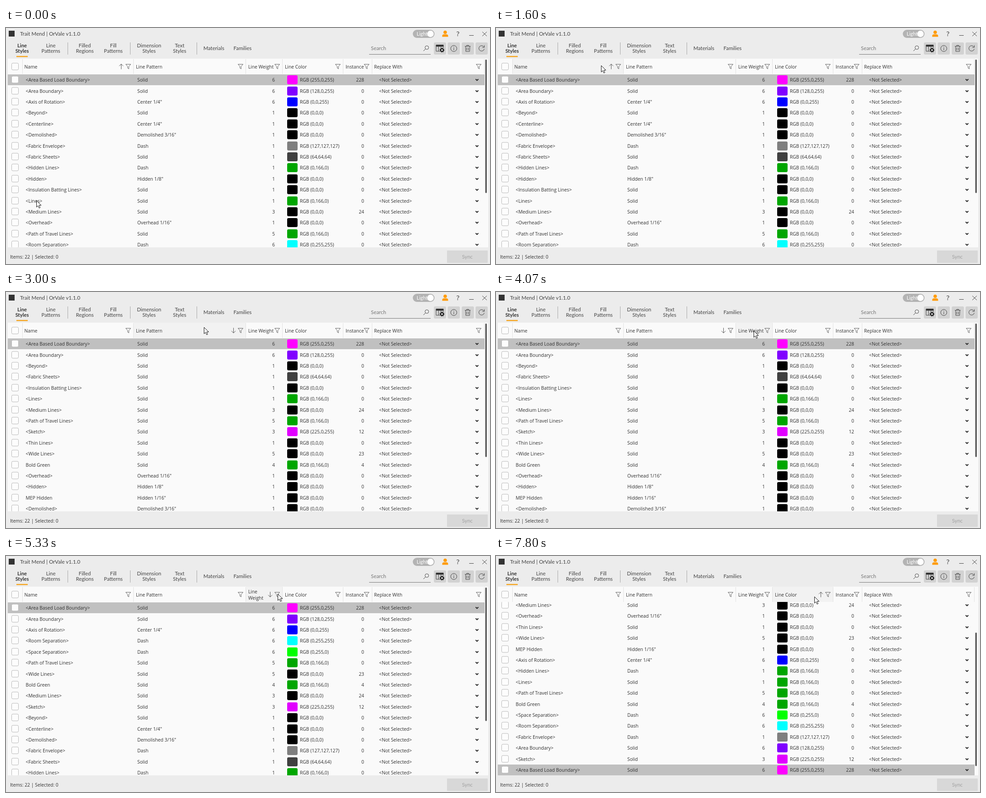
Write an HTML page that moves like this. It is 1069x524 px and loops after 8000 ms.

```html
<!DOCTYPE html>
<html lang="en">
<head>
<meta charset="utf-8">
<title>Line style table</title>
<style>
  html, body { margin: 0; width: 100%; height: 100%; overflow: hidden; background: #ececec; }
  svg { display: block; }
  text { font: 10.3px "Open Sans", "Noto Sans", sans-serif; fill: #303030; white-space: pre; }
  .ui { font: 11.4px Lato, sans-serif; fill: #444; }
  .mid { text-anchor: middle; }
  .end { text-anchor: end; }
  .line { fill: none; stroke: #444; stroke-width: 1; }
</style>
</head>
<body>
<svg id="stage" width="1069" height="524" viewBox="0 0 1069 524">
  <defs><clipPath id="body"><rect x="4" y="102" width="1053" height="385"/></clipPath></defs>
</svg>
<script>
const LOOP = 8000, STEP = 1000 / 15, ROW = 24.4, FIRST = 115.2, LAST = 475;
const stage = document.getElementById('stage');

function add(tag, attrs = {}, parent = stage, content) {
  const el = document.createElementNS('http://www.w3.org/2000/svg', tag);
  for (const key in attrs) el.setAttribute(key, attrs[key]);
  if (content !== undefined) el.textContent = content;
  parent.appendChild(el);
  return el;
}
const rect = (x, y, width, height, fill, rx = 0, parent = stage) =>
  add('rect', { x, y, width, height, fill, rx }, parent);
const label = (x, y, content, cls = '', parent = stage) =>
  add('text', { x, y, class: cls }, parent, content);
const path = (d, attrs = {}, parent = stage) => add('path', { d, class: 'line', ...attrs }, parent);
const checkbox = (y, parent = stage) =>
  add('rect', { x: 12.5, y: y - 7.5, width: 15, height: 15, rx: 2.5, fill: '#fdfdfd', stroke: '#b8b8b8' }, parent);
const show = (el, on) => el.setAttribute('visibility', on ? 'visible' : 'hidden');
const move = (el, x, y) => el.setAttribute('transform', `translate(${x} ${y})`);

function drawTitleBar() {
  rect(6, 6, 13, 13, '#333');
  label(31, 17, 'Trait Mend | OrVale v1.1.0', 'ui').style.fontSize = '11.6px';
  rect(898.5, 4, 48, 18, '#b3b3b3', 9);
  label(907, 17, 'Light', 'ui').style.cssText = 'fill:#fff;font-size:11px';
  add('circle', { cx: 937.5, cy: 13, r: 7.2, fill: '#fff' });
  add('circle', { cx: 970, cy: 9.5, r: 3.8, fill: '#ff9c0a' });
  path('M963.5 19.5v-2q0-3.5 4-3.5h5q4 0 4 3.5v2z', { style: 'fill:#ff9c0a;stroke:none' });
  label(998, 18, '?', 'mid').style.fontSize = '14.5px';
  path('M1023 16.5h10', { 'stroke-width': 1.5 });
  path('M1052 8.5l10 9.5M1062 8.5l-10 9.5', { 'stroke-width': 1.3 });
}

function drawToolbar() {
  const tabs = [[35.5, 'Line', 'Styles'], [99, 'Line', 'Patterns'], [174, 'Filled', 'Regions'],
    [237, 'Fill', 'Patterns'], [316, 'Dimension', 'Styles'], [383.5, 'Text', 'Styles']];
  tabs.forEach(([x, top, bottom], i) => {
    [label(x, 43, top, 'ui mid'), label(x, 55, bottom, 'ui mid')].forEach(el => {
      if (!i) el.style.cssText = 'font-weight:700;fill:#333;font-size:11.2px';
    });
  });
  label(459, 49, 'Materials', 'ui mid');
  label(522.5, 49, 'Families', 'ui mid');
  rect(23, 62, 25, 2.5, '#f5a623');
  [136.5, 274.5, 421.5].forEach(x => path(`M${x} 32v27`, { style: 'stroke:#a8a8a8' }));

  label(806, 49, 'Search', 'ui').style.fill = '#777';
  path('M802 58.5h136', { style: 'stroke:#777' });
  add('circle', { cx: 929.5, cy: 43.5, r: 4, class: 'line' });
  path('M926.7 46.4l-4.7 4.6');
  [945, 975.5, 1006.5, 1037].forEach(x => rect(x, 32, 27, 27, '#d2d2d2', 3));
  path('M966 44v-6.5h-16v14h8M950 41h16M955.3 37.5v14M960.7 37.5v7', { 'stroke-width': 1.4 });
  path('M950 38h16v2.5h-16z', { style: 'fill:#222' });
  add('circle', { cx: 963, cy: 49, r: 3.2, fill: '#d2d2d2', stroke: '#222', 'stroke-width': 2.2 });
  add('circle', { cx: 963, cy: 49, r: 4.5, fill: 'none', stroke: '#222', 'stroke-width': 1.4, 'stroke-dasharray': '1.8 1.73' });
  add('circle', { cx: 989, cy: 45.5, r: 6.7, class: 'line' });
  path('M989 44.5v4.5M989 41.7v1.4', { 'stroke-width': 1.4 });
  path('M1013.5 40.5h12.5M1017.5 40.5v-2h4.5v2M1015 40.5l.6 11.5h8.3l.7-11.5M1018 43.5v6M1021.5 43.5v6');
  path('M1055.5 42a6 6 0 1 0 .8 4.5M1056.5 38.5v4.5h-4.5', { 'stroke-width': 1.3 });
}

const columns = {
  name: { x: 36, right: 282, text: 40.5, title: 'Name', funnel: 270, arrow: 254.5 },
  pattern: { x: 282, right: 530, text: 287, title: 'Line Pattern', funnel: 518, arrow: 502.5 },
  weight: { x: 530, right: 611, text: 535, title: 'Line Weight', funnel: 599, arrow: 583.5 },
  color: { x: 611, right: 745, text: 616, title: 'Line Color', funnel: 733, arrow: 717.5 },
  instance: { x: 745, right: 809, text: 750, title: 'Instance', funnel: 796.5 },
  replace: { x: 809, right: 1057, text: 813, title: 'Replace With', funnel: 1044 }
};

const rows = `<Area Based Load Boundary>|Solid|6|255,0,255|228
<Area Boundary>|Solid|6|128,0,255|0
<Axis of Rotation>|Center 1/4"|6|0,0,255|0
<Beyond>|Solid|1|0,0,0|0
<Centerline>|Center 1/4"|1|0,0,0|0
<Demolished>|Demolished 3/16"|1|0,0,0|0
<Fabric Envelope>|Dash|1|127,127,127|0
<Fabric Sheets>|Solid|1|64,64,64|0
<Hidden Lines>|Dash|1|0,166,0|0
<Hidden>|Hidden 1/8"|1|0,0,0|0
<Insulation Batting Lines>|Solid|1|0,0,0|0
<Lines>|Solid|1|0,166,0|0
<Medium Lines>|Solid|3|0,0,0|24
<Overhead>|Overhead 1/16"|1|0,0,0|0
<Path of Travel Lines>|Solid|5|0,166,0|0
<Room Separation>|Dash|6|0,255,255|0
<Sketch>|Solid|3|225,0,255|12
<Space Separation>|Dash|6|0,255,0|0
<Thin Lines>|Solid|1|0,0,0|0
<Wide Lines>|Solid|5|0,0,0|23
Bold Green|Solid|4|0,166,0|4
MEP Hidden|Hidden 1/16"|1|0,0,0|0`.split('\n').map((line, order) => {
  const [name, pattern, weight, rgb, instance] = line.split('|');
  return { name, pattern, weight, color: `RGB (${rgb})`, rgb, instance, order };
});

function drawRow(row, parent) {
  const g = row.el = add('g', {}, parent);
  if (!row.order) rect(4, -12, 1053, 24, '#c0c0c0', 0, g);
  checkbox(-0.5, g);
  label(43.5, 4, row.name, '', g);
  label(290, 4, row.pattern, '', g);
  label(594, 4, row.weight, 'end', g);
  rect(621, -10, 23, 20, `rgb(${row.rgb})`, 3, g);
  label(649, 4, row.color, '', g);
  label(791, 4, row.instance, 'end', g);
  label(824, 4, '<Not Selected>', '', g);
  path('M1037.3 -1.5l3 3 3-3', { style: 'stroke:#222;stroke-width:1.9' }, g);
}

drawTitleBar();
drawToolbar();
rect(4, 68, 1061, 419, '#fafafa');
const hover = rect(0, 68, 0, 34, '#f2f2f2');
const bodyRows = add('g', { 'clip-path': 'url(#body)' });
rows.forEach(row => drawRow(row, bodyRows));

checkbox(85.5);
path('M36.5 69v33', { style: 'stroke:#e2e2e2' });
for (const col of Object.values(columns)) {
  path(`M${col.right - 0.5} 69v33`, { style: 'stroke:#e2e2e2' });
  col.label = label(col.text, 89.5, col.title);
  path(`M${col.funnel - 5.5} 80.5h11l-4.2 5v5.2l-2.6-1.7v-3.5z`, { style: 'stroke:#555;stroke-width:.9' });
}
const wrapped = add('g');
label(535, 83, 'Line', '', wrapped);
label(535, 97, 'Weight', '', wrapped);
const arrow = add('g');
const arrowShape = path('M0 6v-11.5M-4.5 -1l4.5-4.6 4.5 4.6', { style: 'stroke:#555' }, arrow);
const thumb = rect(1058.5, 70, 3.5, 296.5, '#5a5a5a', 1.7);
const focusRing = add('rect', { x: 4.5, y: 68.5, width: 1060, height: 418, fill: 'none', stroke: '#333', 'stroke-dasharray': '1 1.5' });
label(9, 511.5, 'Items: 22 | Selected: 0');
rect(974, 494, 90, 27.5, '#d8d8d8', 1);
label(1019, 512, 'Sync', 'ui mid').style.fill = '#a0a0a0';

const pointer = path('M0 0v14.2l3.3-3.1 2.3 5.3 2.4-1-2.3-5.2h4.6z', { style: 'fill:#fff;stroke:#111' });
const resizer = path('M-10.5 0l5-4.5v3h11v-3l5 4.5-5 4.5v-3h-11v3z', { style: 'fill:#fff;stroke:#111' });

// Start time, sorted column, direction
const sorts = [[0, 'name', 1], [1200, 'name', -1], [1600, 'name', 1], [2665, 'pattern', 1],
  [3000, 'pattern', -1], [4200, 'weight', 1], [5200, 'weight', -1], [6730, 'color', 1]];
// Time, x, y of the pointer
const track = [[0, 67, 383], [66, 67, 383], [800, 232, 83], [1600, 232, 83], [1867, 330, 76],
  [2200, 435, 78], [2400, 435, 78], [2530, 437, 78], [3000, 437, 78], [3800, 568, 86],
  [4000, 569, 86], [4667, 569, 86], [4933, 632, 86], [5133, 585, 86], [5267, 585, 86],
  [5467, 645, 80], [5667, 757, 80], [5933, 703, 90], [LOOP, 703, 90]];

function pointerAt(t) {
  const i = Math.max(1, track.findIndex(key => key[0] > t));
  const [t0, x0, y0] = track[i - 1], [t1, x1, y1] = track[i];
  const p = (t - t0) / (t1 - t0), e = p * p * (3 - 2 * p);
  return [Math.round(x0 + (x1 - x0) * e), Math.round(y0 + (y1 - y0) * e)];
}

let current;
function applySort(entry) {
  if (entry === current) return;
  current = entry;
  const [, key, dir] = entry;
  const compare = (a, b) => key === 'name' ? dir * (a.order - b.order)
    : dir * ((a[key] > b[key]) - (a[key] < b[key])) || a.order - b.order;
  const sorted = [...rows].sort(compare);
  const scroll = Math.max(0, FIRST + sorted.indexOf(rows[0]) * ROW - LAST);
  sorted.forEach((row, i) => move(row.el, 0, Math.round(FIRST + i * ROW - scroll)));
  thumb.setAttribute('y', 70 + scroll * 0.78);
  move(arrow, columns[key].arrow, 85.5);
  arrowShape.setAttribute('transform', `scale(1 ${dir})`);
  show(wrapped, key === 'weight');
  show(columns.weight.label, key !== 'weight');
}

function render(time) {
  const t = time % LOOP;
  applySort(sorts.filter(entry => entry[0] <= t).pop());
  show(focusRing, t >= 930 && t < 1200);

  const tick = Math.floor((t + 5) / STEP) * STEP;
  const [x, y] = pointerAt(tick);
  const resizing = (tick > 4860 && tick < 5000) || (tick > 5640 && tick < 5700);
  show(pointer, !resizing);
  show(resizer, resizing);
  move(pointer, x + 0.5, y + 0.5);
  move(resizer, x + 0.5, y);

  const over = y > 68 && y < 102 && Object.values(columns).find(col => x >= col.x && x < col.right);
  show(hover, over);
  if (over) {
    hover.setAttribute('x', over.x);
    hover.setAttribute('width', over.right - over.x);
  }
}

const start = performance.now();
function frame() {
  render(performance.now() - start);
  requestAnimationFrame(frame);
}
frame();
</script>
</body>
</html>
```
